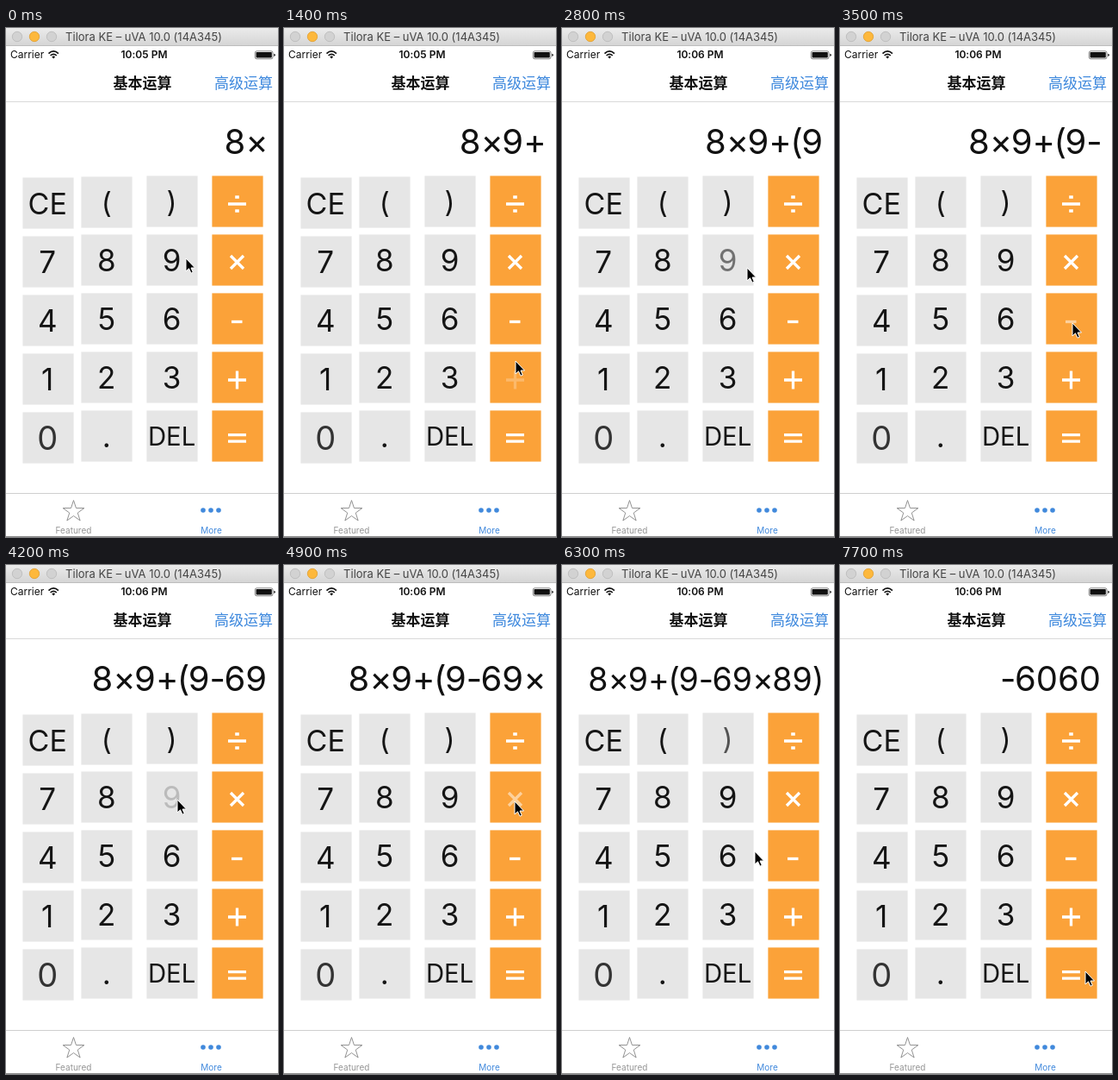
Recreate the animation shown at these times as an HTML page. Size 316 by 590 pixels, loop 8000 ms.

```html
<!DOCTYPE html>
<html lang="zh">
<head>
<meta charset="utf-8">
<title>Calculator</title>
<style>
  html, body { margin: 0; width: 100%; height: 100%; overflow: hidden; background: #fff; }
  svg { display: block; width: 316px; height: 590px; }
  text { font-family: Inter, Roboto, "Liberation Sans", sans-serif; font-variant-ligatures: no-contextual; }
  .cjk { font-family: "Noto Sans CJK SC", "Noto Sans CJK", sans-serif; font-size: 17px; }
  .mid { text-anchor: middle; }
  .op { letter-spacing: -.04em; }
  .sign { fill: none; stroke: #fff; stroke-width: 3.3; }
</style>
</head>
<body>
<svg viewBox="0 0 316 590" xmlns="http://www.w3.org/2000/svg">
  <defs>
    <linearGradient id="bar" x2="0" y2="1">
      <stop stop-color="#ebebeb"/><stop offset="1" stop-color="#d4d4d4"/>
    </linearGradient>
  </defs>
  <rect width="316" height="590" fill="#fff"/>

  <!-- window bar -->
  <rect width="316" height="21" fill="url(#bar)"/>
  <rect y="20" width="316" height="1" fill="#bdbdbd"/>
  <g stroke-width=".8">
    <circle cx="13" cy="10" r="5.7" fill="#d2d2d2" stroke="#b9b9b9"/>
    <circle cx="33" cy="10" r="5.7" fill="#fdb83c" stroke="#e09d2c"/>
    <circle cx="53" cy="10" r="5.7" fill="#d2d2d2" stroke="#b9b9b9"/>
  </g>
  <text class="mid" x="160" y="15" font-size="13" fill="#444">Tilora KE – uVA 10.0 (14A345)</text>

  <!-- status bar -->
  <text x="5" y="35" font-size="12" fill="#111">Carrier</text>
  <g fill="none" stroke="#111" stroke-width="1.7">
    <path d="M49.5 29.6Q55.2 24.2 60.9 29.6M51.6 32Q55.2 28.6 58.8 32"/>
    <path d="M53.3 33.4Q55.2 31.7 57.1 33.4L55.2 35.6Z" fill="#111" stroke="none"/>
  </g>
  <text id="clock" class="mid" x="160.500" y="35" font-size="12" font-weight="600" fill="#111"></text>
  <rect x="289.300" y="26.800" width="20.700" height="9" rx="2" fill="none" stroke="#333" stroke-width=".6"/>
  <rect x="290.500" y="28" width="18.300" height="6.600" rx=".8" fill="#111"/>
  <path d="M311.300 29.700q1.500 .4 1.500 1.600t-1.500 1.600z" fill="#111"/>

  <!-- navigation -->
  <text class="cjk mid" x="158.500" y="69.500" font-weight="700" fill="#111">基本运算</text>
  <text class="cjk mid" x="276" y="69.500" fill="#3d88dd">高级运算</text>
  <rect y="85" width="316" height="1" fill="#d9d9d9"/>

  <text id="display" x="303" y="146" text-anchor="end" fill="#111"></text>
  <g id="keys"></g>

  <!-- tab bar -->
  <rect y="539" width="316" height="1" fill="#cfcfcf"/>
  <path id="star" fill="none" stroke="#929292"/>
  <text class="mid" x="78.500" y="585.500" font-size="10" fill="#959595">Featured</text>
  <g fill="#4189dc">
    <circle cx="229" cy="559" r="2.8"/><circle cx="238" cy="559" r="2.8"/><circle cx="247" cy="559" r="2.8"/>
    <text class="mid" x="238.500" y="585.500" font-size="10">More</text>
  </g>
  <rect y="589" width="316" height="1" fill="#8c8c8c"/>

  <path id="cursor" d="M0 0V15L3.500 11.800 6 17.200 8.300 16.200 6 11H10.500Z" fill="#000" stroke="#fff"/>
</svg>
<script>
const $ = id => document.getElementById(id);
const STEP = 700, LOOP = 8000;

function add(parent, tag, attrs, content = '') {
  const el = document.createElementNS('http://www.w3.org/2000/svg', tag);
  for (const name in attrs) el.setAttribute(name, attrs[name]);
  el.textContent = content;
  return parent.appendChild(el);
}

// Columns: left edge, top edge, label centre, labels from top to bottom
const columns = [
  [19, 173, 29.2, ['CE', '7', '4', '1', '0']],
  [87, 171, 29.8, ['(', '8', '5', '2', '.']],
  [163, 171, 29.6, [')', '9', '6', '3', 'DEL']],
  [239, 171, 29.5, ['÷', '×', '-', '+', '=']]
];
// Label styles: font size, baseline below the key's top
const styles = { CE: [34, 42.5], DEL: [29.3, 41], '(': [33, 42], ')': [33, 42], 0: [38, 44] };
// Operator strokes around the key's centre
const signs = {
  '÷': 'M-10.500 3H10.500M-2.300 -5H2.300M-2.300 11H2.300',
  '×': 'M-7.500 -5L7.500 10M7.500 -5L-7.500 10',
  '-': 'M-6.500 3.500H6',
  '+': 'M-10.500 3H10.500M0 -7.500V13.500',
  '=': 'M-10.500 -1.300H10.500M-10.500 6.200H10.500'
};
const labels = {};

for (const [x, top, centre, names] of columns) {
  names.forEach((name, row) => {
    const y = top + row * 68 + (name === '(' ? 1 : 0);
    const sign = signs[name];
    add($('keys'), 'rect', {
      x: x + .4, y: y + .4, width: 59.2, height: 59.2, fill: sign ? '#fba239' : '#e6e6e6'
    });
    if (sign) {
      labels[name] = add($('keys'), 'path', { class: 'sign', d: sign, transform: `translate(${x + centre} ${y + 30})` });
      return;
    }
    const [size, base] = styles[name] || [35, 43];
    labels[name] = add($('keys'), 'text', {
      class: 'mid', x: x + centre, y: y + base, 'font-size': size, fill: name === '0' ? '#333' : '#151515'
    }, name);
  });
}

const points = Array.from({ length: 10 }, (_, i) => {
  const r = i % 2 ? 5 : 13, a = i * Math.PI / 5;
  return [78.5 + r * Math.sin(a), 560.5 - r * Math.cos(a)].map(v => v.toFixed(2));
});
$('star').setAttribute('d', 'M' + points.join('L') + 'Z');

// Display text, cursor x, cursor y, pressed key, its label opacity
const steps = [
  ['8×', 209, 267],
  ['8×9', 211, 271, '9', .5],
  ['8×9+', 269, 386, '+', .25],
  ['8×9+(', 126, 208, '(', .5],
  ['8×9+(9', 215, 278, '9', .55],
  ['8×9+(9-', 270, 342, '-', .5],
  ['8×9+(9-69', 199, 272, '9', .2],
  ['8×9+(9-69×', 268, 274, '×', .5],
  ['8×9+(9-69×8', 181, 264, '8', .45],
  ['8×9+(9-69×89)', 224, 332, ')', .7],
  ['-6060', 282, 470, '=', .5],
  ['-6060', 285, 471]
];

let shown = -1;
function show(index) {
  if (index === shown) return;
  shown = index;
  const [text, x, y, key, opacity] = steps[index];
  const display = $('display');
  display.textContent = '';
  display.setAttribute('font-size', text.length > 11 ? 37.5 : 40);
  for (const char of text) add(display, 'tspan', /\d/.test(char) ? {} : { class: 'op' }, char);
  for (const name in labels) labels[name].setAttribute('opacity', name === key ? opacity : 1);
  $('cursor').setAttribute('transform', `translate(${x} ${y})`);
  $('clock').textContent = index < 3 ? '10:05 PM' : '10:06 PM';
}

const start = performance.now();
function tick() {
  const time = (performance.now() - start) % LOOP;
  show(Math.min(steps.length - 1, Math.floor(time / STEP)));
  requestAnimationFrame(tick);
}
tick();
</script>
</body>
</html>
```
